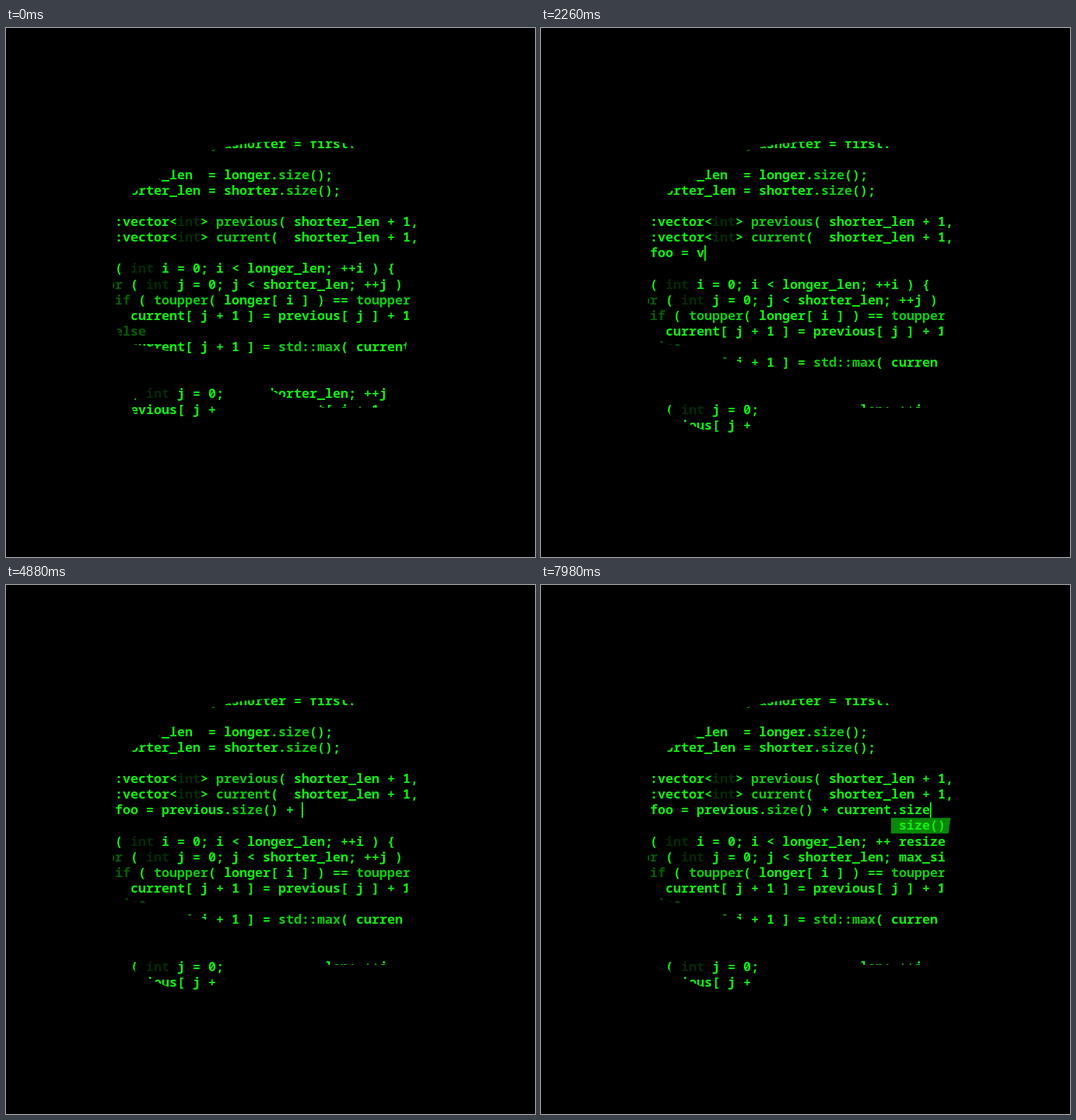
Animation, 748 px wide and 748 px high, one loop 8000 ms. Source, as an HTML page:

```html
<!DOCTYPE html>
<html lang="en">
<head>
<meta charset="utf-8">
<title>Code completion</title>
<style>
  html, body { margin: 0; width: 100%; height: 100%; overflow: hidden; background: #000; }
  svg { display: block; width: 100%; height: 100%; }
  text {
    font: 600 18.333px "Noto Sans Mono", "DejaVu Sans Mono", monospace;
    white-space: pre;
    fill: #0df20d;
  }
  .fn { fill: #0bcc0b; }
  .kw { fill: #085c08; }
  .type { fill: #042a04; }
</style>
</head>
<body>
<svg viewBox="0 0 748 748">
  <defs>
    <clipPath id="shape">
      <path d="M151 390 L151 350 L154 300 Q152 268 165 246 L178 235 Q198 220 218 213 Q236 199 270 183
               L295 172 Q340 161 385 160 L460 160 Q480 161 495 170 Q575 200 583 270 L583 300
               L579 330 L573 374 L569 425 L565 455 L561 475 L547 510 L541 537 L450 537
               Q420 533 395 523 L375 512 L360 504 L338 488 L297 481 L280 472 L255 466
               L230 457 L200 450 L172 446 Q153 436 151 390 Z"/>
      <path d="M178 534 Q181 522 193 510 Q200 505 215 505 L298 505 Q307 506 307 520
               L310 555 Q308 576 285 576 L252 576 L228 568 L200 556 L184 548 Q178 543 178 534 Z"/>
    </clipPath>
  </defs>
  <rect width="748" height="748"/>
  <g id="screen" clip-path="url(#shape)"></g>
</svg>
<script>
const LOOP = 8000, LEFT = 110, CHAR = 11, TOP = 169.5, LINE = 22.12, EDIT_ROW = 7;
const screen = document.getElementById('screen');

const head = [
  'const std::string &shorter = first.size() < second.size()',
  '',
  'int longer_len  = longer.size();',
  'int shorter_len = shorter.size();',
  '',
  'std::vector<int> previous( shorter_len + 1, 0 );',
  'std::vector<int> current(  shorter_len + 1, 0 );'
];
const tail = [
  '',
  'for ( int i = 0; i < longer_len; ++i ) {',
  '  for ( int j = 0; j < shorter_len; ++j ) {',
  '    if ( toupper( longer[ i ] ) == toupper( shorter[ j ] ) )',
  '      current[ j + 1 ] = previous[ j ] + 1;',
  '    else',
  '      current[ j + 1 ] = std::max( current[ j ], previous[ j + 1 ] );',
  '  }',
  '',
  '  for ( int j = 0; j < shorter_len; ++j )',
  '    previous[ j + 1 ] = current[ j + 1 ];'
];

const members = [
  'assign( size_type n, const T &u )', 'at( size_type n )', 'back()', 'begin()',
  'capacity() const', 'clear()', 'data()', 'empty() const', 'end()',
  'erase( iterator position )', 'front()'
];
const sizes = ['size() const', 'resize( size_type n )', 'max_size() const'];
const vNames = ['previous', 'vector'];
const cNames = ['first_char_same', 'current'];

// Each state: start time, typed line (null before the line exists), popup, popup column, selection
const states = [[0, null], [400, '']];

function put(time, text, list, col, selected = -1) {
  states.push([time, text, list, col, selected]);
}
function type(from, step, base, chars) {
  [...chars].forEach((c, i) => put(from + i * step, base += c));
  return base;
}

let line = type(1000, 115, '', 'int foo = ');
put(2160, line + 'v');
put(2340, line + 'v', vNames, 10);
line += 'previous';
put(2780, line, vNames, 10, 0);
line += '.';
put(3180, line);
put(3280, line, members, 19);
put(3760, line + 's', sizes, 19);
line += 'size';
put(4080, line, sizes, 19, 0);
line = type(4340, 105, line, '() + ');
put(5140, line + 'c');
put(5260, line + 'c', cNames, 28);
put(5720, line + cNames[0], cNames, 28, 0);
line += 'current';
put(6080, line, cNames, 28, 1);
line += '.';
put(6640, line);
put(6740, line, members, 36);
put(7180, line + 's', sizes, 36);
put(7580, line + 'size', sizes, 36, 0);

const escape = s => s.replace(/&/g, '&amp;').replace(/</g, '&lt;').replace(/>/g, '&gt;');
const xAt = col => LEFT + col * CHAR;
const yAt = row => TOP + row * LINE;

function paint(code) {
  const token = /\bint\b|\b(?:if|else|for)\b|[\w:]+(?=\()/g;
  let out = '', last = 0;
  for (const m of code.matchAll(token)) {
    const kind = m[0] === 'int' ? 'type' : /^(if|else|for)$/.test(m[0]) ? 'kw' : 'fn';
    out += escape(code.slice(last, m.index)) + `<tspan class="${kind}">${m[0]}</tspan>`;
    last = m.index + m[0].length;
  }
  return out + escape(code.slice(last));
}

const label = (col, row, markup) => `<text x="${xAt(col)}" y="${yAt(row)}">${markup}</text>`;
const box = (x, row, w, rows, fill) =>
  `<rect x="${x}" y="${yAt(row) - 17.2}" width="${w}" height="${rows * LINE}" fill="${fill}"/>`;

function popup(list, col, selected) {
  const x = xAt(col - 1), row = EDIT_ROW + 1;
  return box(x, row, 600 - x, list.length, '#000') +
    (selected < 0 ? '' : box(x, row + selected, 600 - x, 1, '#088808')) +
    list.map((item, i) => label(col, row + i, escape(item))).join('');
}

function draw([, text, list, col, selected]) {
  const lines = text === null ? [...head, ...tail] : [...head, text, ...tail];
  let markup = lines.map((code, row) => label(0, row, paint(code))).join('');
  if (text !== null) markup += box(xAt(text.length), EDIT_ROW, 2, 1, '#0df20d');
  if (list) markup += popup(list, col, selected);
  screen.innerHTML = markup;
}

let shown = null;
function update(now) {
  const t = now % LOOP;
  const state = states.findLast(s => s[0] <= t);
  if (state !== shown) draw(shown = state);
}

const start = performance.now();
function tick() {
  update(performance.now() - start);
  requestAnimationFrame(tick);
}
tick();
</script>
</body>
</html>
```
